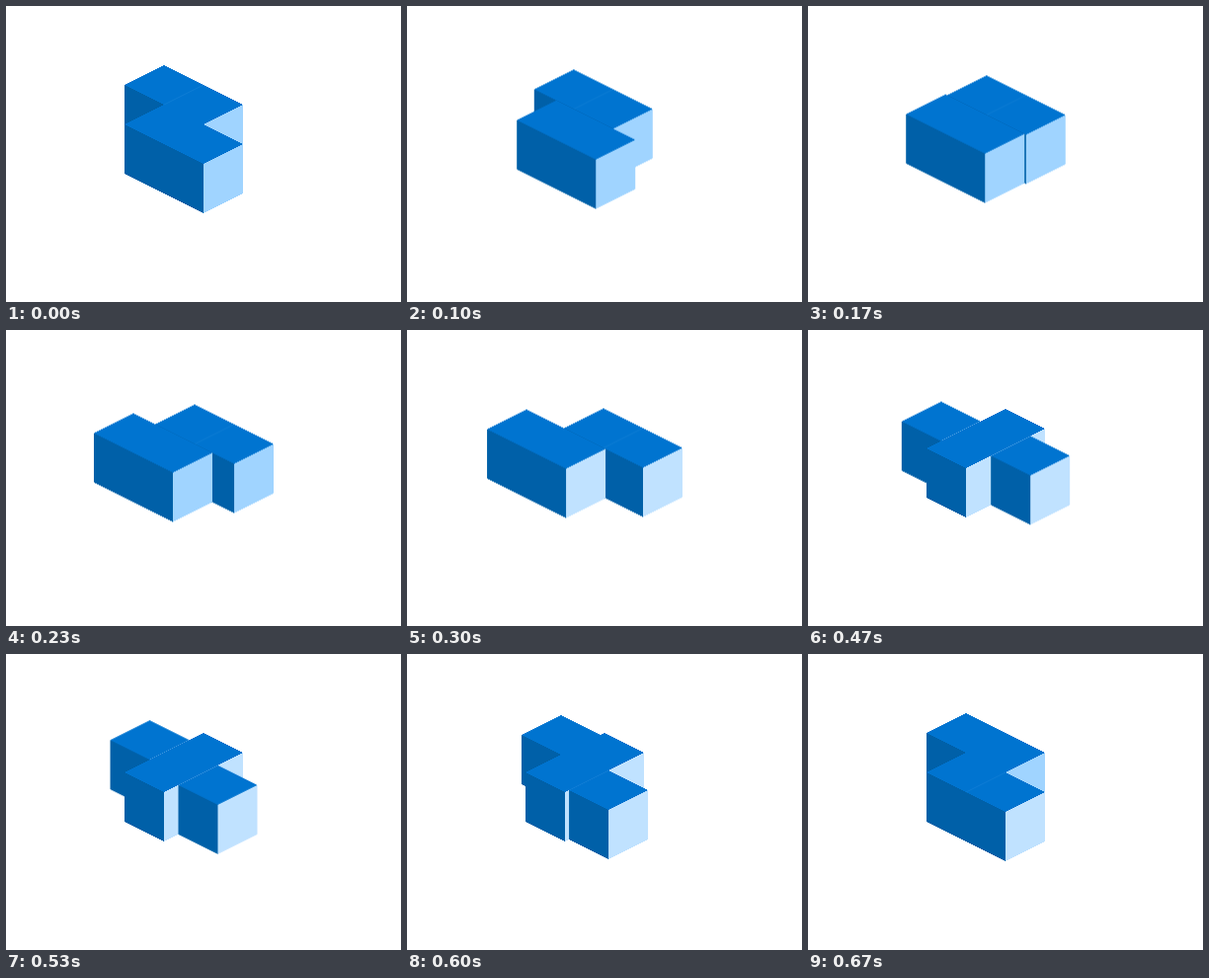
An HTML page for the animation above (0.73 s loop, 400 px wide and 300 px high).

```html
<!DOCTYPE html>
<html lang="en">
<head>
<meta charset="utf-8">
<title>Sliding cubes</title>
<style>
  html, body { margin: 0; width: 100%; height: 100%; overflow: hidden; background: #fff; }
  svg { display: block; width: 400px; height: 300px; shape-rendering: crispEdges; }

  .top { fill: #0074d0; }
  .left { fill: #0060a8; }
  .right { fill: #a0d4ff; animation: glow 730ms step-end infinite; }
  .seam { fill: none; stroke: #1c84d8; stroke-width: .5; shape-rendering: auto; }

  /* cubic-bezier(1/3, 0, 2/3, 1) is smoothstep */
  .slide { animation: 730ms cubic-bezier(.3333, 0, .6667, 1) infinite; }
  .back { animation-name: back; }
  .front { animation-name: front; }
  .rise { animation-name: rise; }
  .fall { animation-name: fall; }

  .rows { animation: rows 730ms step-end infinite; }
  .columns { animation: columns 730ms step-end infinite; }

  /* Rows slide along one axis, then the outer cubes along the other */
  @keyframes back {
    0% { transform: translate(0, 0); }
    45.66%, 100% { transform: translate(40px, 20px); }
  }
  @keyframes front {
    0% { transform: translate(0, 0); }
    45.66%, 100% { transform: translate(-40px, -20px); }
  }
  @keyframes rise {
    0%, 45.66% { transform: translate(0, 0); }
    91.32%, 100% { transform: translate(40px, -20px); }
  }
  @keyframes fall {
    0%, 45.66% { transform: translate(0, 0); }
    91.32%, 100% { transform: translate(-40px, 20px); }
  }
  @keyframes rows {
    0% { visibility: visible; }
    45.66%, 100% { visibility: hidden; }
  }
  @keyframes columns {
    0% { visibility: hidden; }
    45.66%, 100% { visibility: visible; }
  }
  @keyframes glow {
    0% { fill: #a0d4ff; }
    26% { fill: #c0e2ff; }
    86%, 100% { fill: #a0d4ff; }
  }
</style>
</head>
<body>
<svg viewBox="0 0 400 300">
  <defs>
    <g id="row">
      <path class="top" d="M120 80l40-20 80 40-40 20z"/>
      <path class="left" d="M120 80l80 40v50l-80-40z"/>
      <path class="right" d="M200 120l40-20v50l-40 20z"/>
    </g>
    <g id="cube">
      <path class="top" d="M-40 0l40-20 40 20-40 20z"/>
      <path class="left" d="M-40 0l40 20v50l-40-20z"/>
      <path class="right" d="M0 20l40-20v50l-40 20z"/>
    </g>
  </defs>

  <g class="rows">
    <g class="slide back">
      <use href="#row"/>
      <path class="seam" d="M160 100l40-20"/>
    </g>
    <g class="slide front"><use href="#row" y="40"/></g>
  </g>

  <g class="columns">
    <g class="slide rise"><use href="#cube" x="120" y="100"/></g>
    <path class="top" d="M120 120l80-40 40 20-80 40z"/>
    <path class="left" d="M120 120l40 20v50l-40-20z"/>
    <path class="right" d="M160 140l80-40v50l-80 40z"/>
    <g class="slide fall">
      <use href="#cube" x="240" y="120"/>
      <path class="seam" d="M200 120l40-20"/>
    </g>
  </g>
</svg>
</body>
</html>
```
